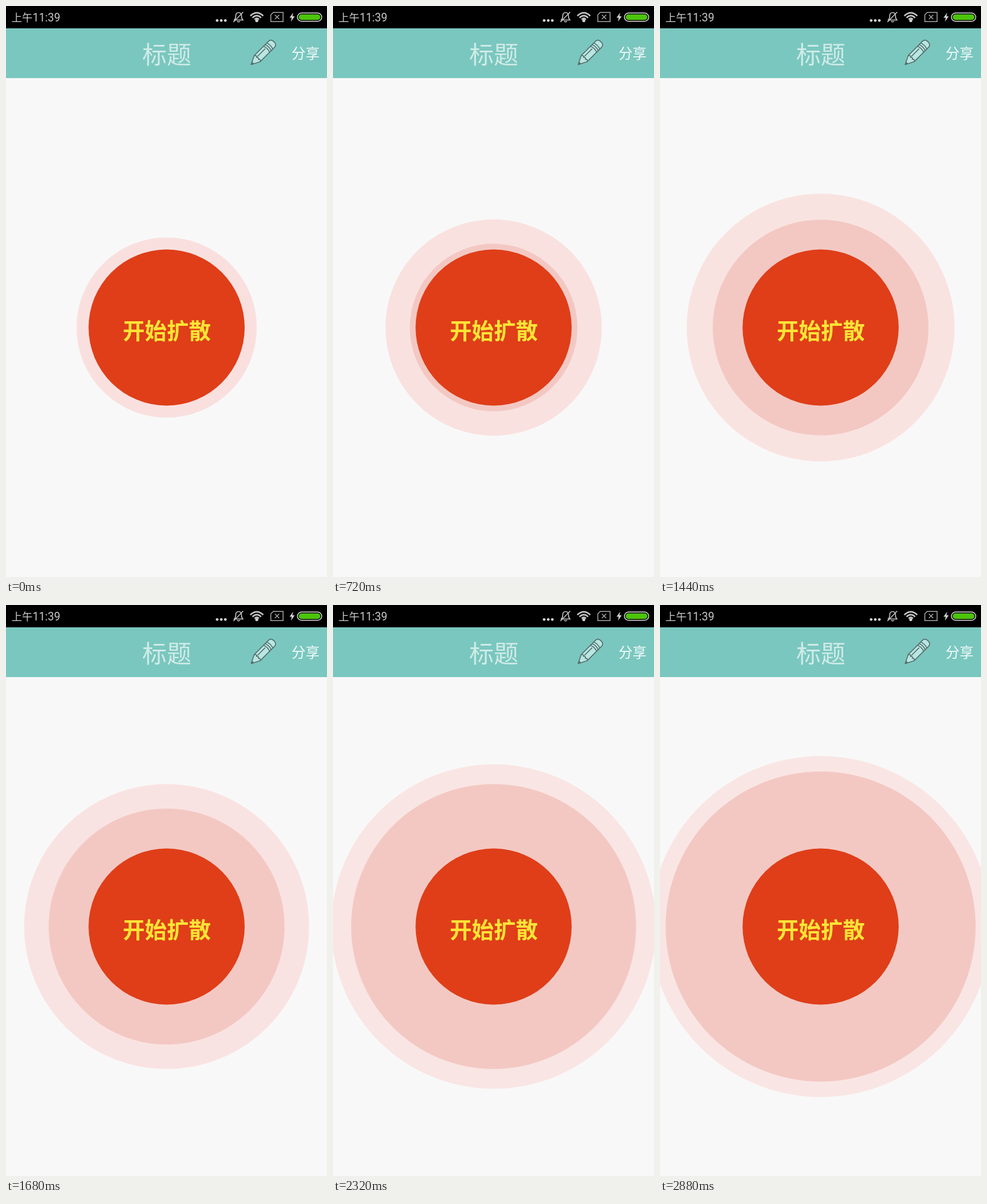
Recreate the animation shown at these times as an HTML page. Size 561 px wide and 998 px high, loop 2.96 s.

```html
<!DOCTYPE html>
<html lang="zh-CN">
<head>
<meta charset="utf-8">
<title>扩散</title>
<style>
  html, body { margin: 0; width: 100%; height: 100%; overflow: hidden; background: #f8f8f8; }
  svg { display: block; width: 100%; height: 100%; }
  text { font-family: "Noto Sans CJK SC", "Noto Sans CJK", sans-serif; }
  .num { font-family: Roboto, sans-serif; }
</style>
</head>
<body>
<svg viewBox="0 0 561 998">
  <rect width="561" height="998" fill="#f8f8f8"/>
  <circle id="outer" cx="280.7" cy="562"/>
  <circle id="inner" cx="280.7" cy="562" fill="#f3c8c3"/>
  <circle cx="280.7" cy="562" r="136.4" fill="#df3e18"/>
  <text x="281" y="582" font-size="38.5" font-weight="700" text-anchor="middle" fill="#fbe436">开始扩散</text>

  <rect y="39" width="561" height="87" fill="#7ac7bf"/>
  <text x="281" y="101" font-size="43" text-anchor="middle" fill="#cfebe7">标题</text>
  <text x="499" y="92" font-size="24.5" fill="#f2faf9">分享</text>

  <!-- pencil -->
  <g transform="translate(428.5 102.5) rotate(-45)" fill="#b9e6e2" stroke="#56706e" stroke-width="1.7" stroke-linejoin="round">
    <path d="M0 0L15-7.5H50Q56.5-7.5 56.5 0T50 7.5H15Z"/>
    <path d="M15-7.5Q19-4 15.5-2.5Q19 0 15.5 2.5Q19 5 15 7.5M18-2.5H37M38-7.5Q41 0 38 7.5M42-7.5Q45 0 42 7.5M46-7.5Q49 0 46 7.5" fill="none"/>
    <path d="M0 0L5-2.5V2.5Z" fill="#56706e" stroke="none"/>
  </g>

  <!-- status bar -->
  <rect width="561" height="39" fill="#000"/>
  <text x="9.5" y="26.5" font-size="18.5" fill="#c9c9c9">上午<tspan class="num" font-size="19.4">11:39</tspan></text>
  <g fill="#d2d2d2">
    <circle cx="369" cy="25.3" r="2.4"/>
    <circle cx="376.2" cy="25.3" r="2.4"/>
    <circle cx="383.3" cy="25.3" r="2.4"/>
    <path d="M502 11.5L495.5 20.5H499.3L498 27.5L504.5 18H500.6Z"/>
    <circle cx="438.3" cy="25.6" r="2.7"/>
  </g>
  <g fill="none" stroke="#c6c6c6" stroke-width="1.6">
    <path d="M399 24.5Q401.5 22 401.5 17.5Q401.5 11.5 406.5 11.5T411.5 17.5Q411.5 22 414 24.5ZM404 26.5Q406.5 29 409 26.5M397.5 28L414.5 10.5"/>
    <path d="M427 17.3Q438.3 6.5 449.6 17.3M430.8 20.6Q438.3 13.2 445.8 20.6M434.5 23.6Q438.3 19.8 442.1 23.6" stroke-width="2.6"/>
    <path d="M467 11.3H484.3V27.3H462.8V15.5ZM470 15.5L477.5 23M477.5 15.5L470 23" stroke="#a8a8a8" stroke-width="1.5"/>
  </g>
  <rect x="509.3" y="12.3" width="42.5" height="14.4" rx="7.2" fill="none" stroke="#dedede" stroke-width="1.5"/>
  <rect x="511.5" y="14.4" width="38" height="10.2" rx="5.1" fill="#4cc40a"/>
</svg>
<script>
const LOOP = 2960, STEP = 80;
const outer = document.getElementById('outer');
const inner = document.getElementById('inner');

// [time in ms, radius]
const OUTER = [[0, 157.5], [560, 181], [1040, 207], [1440, 234], [2000, 268], [2320, 283.5], [2880, 298]];
const INNER = [[0, 133], [400, 137], [720, 146.5], [1040, 161.5], [1440, 188.5], [2000, 229.5], [2320, 249], [2880, 271]];

// Smooth curve through the keys
function radius(keys, t) {
  const last = keys.length - 1;
  let i = 0;
  while (i < last - 1 && t >= keys[i + 1][0]) i++;
  const slope = k => {
    const a = keys[Math.max(k - 1, 0)], b = keys[Math.min(k + 1, last)];
    return (b[1] - a[1]) / (b[0] - a[0]);
  };
  const [t0, r0] = keys[i], [t1, r1] = keys[i + 1];
  const d = t1 - t0, u = (t - t0) / d, v = 1 - u;
  return v * v * (1 + 2 * u) * r0 + u * u * (3 - 2 * u) * r1
       + d * u * v * (v * slope(i) - u * slope(i + 1));
}

function draw(ms) {
  const t = Math.floor((ms % LOOP) / STEP) * STEP;
  const fade = t / LOOP;
  outer.setAttribute('r', radius(OUTER, t));
  outer.setAttribute('fill', `rgb(249 ${224 + 6 * fade} ${223 + 5 * fade})`);
  inner.setAttribute('r', radius(INNER, t));
}

const start = performance.now();
function tick() {
  draw(performance.now() - start);
  requestAnimationFrame(tick);
}
draw(0);
requestAnimationFrame(tick);
</script>
</body>
</html>
```
